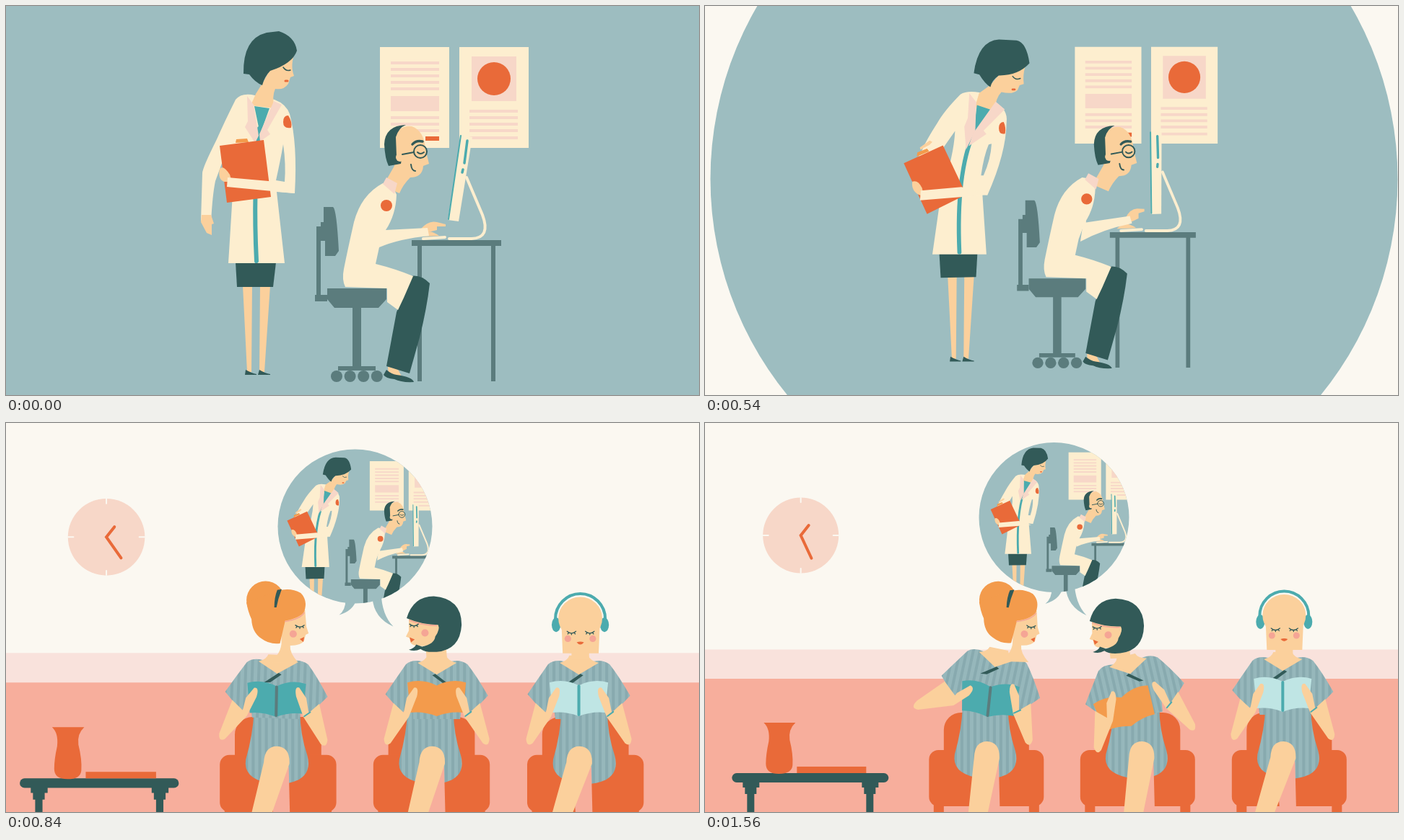
An HTML page with a canvas for the animation above (1.59 s loop, 960 by 540 pixels).

```html
<!DOCTYPE html>
<html lang="en">
<head>
<meta charset="utf-8">
<title>Waiting room</title>
<style>
html, body { margin: 0; overflow: hidden; background: #fbf8f1 }
canvas { display: block }
</style>
</head>
<body>
<canvas id="stage" width="960" height="540"></canvas>
<script>
const c = document.getElementById('stage').getContext('2d');
const LOOP = 1590, STEP = 30;
const AIR = '#9dbdc0', CREAM = '#fdeecf', DARK = '#325a58', SKIN = '#fbd09c', RED = '#e96a39',
  TEAL = '#4cabae', GREY = '#5b7c7d', PINK = '#f7d7c8', WALL = '#fbf8f1', BLUSH = '#f9e2dc',
  CORAL = '#f7ae9c', AMBER = '#f39b4c', ICE = '#bfe5e4', CHEEK = '#f5a595';

// Monotone curve through [time, value] pairs
function key(t, ...k) {
  const i = k.findIndex(p => p[0] > t);
  if (i < 0) return k[k.length - 1][1];
  if (!i) return k[0][1];
  const rate = j => (k[j][1] - k[j - 1][1]) / (k[j][0] - k[j - 1][0]);
  const slope = j => {
    if (!j || j === k.length - 1) return 0;
    const a = rate(j), b = rate(j + 1);
    return a * b <= 0 ? 0 : 2 * a * b / (a + b);
  };
  const [t0, v0] = k[i - 1], [t1, v1] = k[i], h = t1 - t0, u = (t - t0) / h, e = u * u * (3 - 2 * u);
  return v0 + (v1 - v0) * e + h * u * (1 - u) * (slope(i - 1) * (1 - u) - slope(i) * u);
}

// Blend two paths of the same structure
function mix(a, b, k) {
  const num = /-?[\d.]+/g, to = b.match(num);
  let i = 0;
  return a.replace(num, n => +n + (to[i++] - n) * k);
}

function fill(color, d) { c.fillStyle = color; c.fill(new Path2D(d)); }
function line(color, w, d) {
  c.strokeStyle = color; c.lineWidth = w; c.lineCap = 'round'; c.stroke(new Path2D(d));
}
function oval(color, x, y, rx, ry = rx) {
  c.fillStyle = color; c.beginPath(); c.ellipse(x, y, rx, ry, 0, 0, 7); c.fill();
}
function box(color, x, y, w, h, r = 0) {
  c.fillStyle = color; c.beginPath(); c.roundRect(x, y, w, h, r); c.fill();
}
function group(draw) { c.save(); draw(); c.restore(); }
function turn(deg, x, y) { c.translate(x, y); c.rotate(deg * Math.PI / 180); c.translate(-x, -y); }

const cloth = document.createElement('canvas');
cloth.width = 9; cloth.height = 4;
const cc = cloth.getContext('2d');
cc.fillStyle = '#96b7bb'; cc.fillRect(0, 0, 9, 4);
cc.fillStyle = '#88aaaf'; cc.fillRect(0, 0, 4, 4);
const GOWN = c.createPattern(cloth, 'repeat');

function posters() {
  for (const x of [518, 628]) box(CREAM, x, 57, 96, 140);
  for (const y of [77, 86, 95, 104, 113, 153, 162, 171]) box(PINK, 533, y, 67, 4);
  box(PINK, 533, 125, 67, 21);
  box(RED, 581, 181, 19, 6);
  box(PINK, 645, 70, 62, 62);
  oval(RED, 676, 101, 23);
  for (const y of [144, 153, 162, 171, 181]) box(PINK, 642, y, 67, 4);
}

function standingDoctor(lean, carry) {
  const part = (color, a, b, k = lean) => fill(color, mix(a, b, k));
  const stroke = (color, w, a, b) => line(color, w, mix(a, b, lean));
  fill(SKIN, 'M328 388H341L340 508H334ZM352 388H366L358 508H351Z');
  fill(DARK, 'M331 512L332 505Q341 510 347 511V512ZM349 512L351 505Q359 510 366 511V512Z');
  part(DARK, 'M318 356L374 356L370 390L320 390Z', 'M316 356L371 356L369 390L318 391Z');
  part(CREAM,
    'M340 123Q325 121 318 130Q303 160 292 185Q272 225 272 232L270 298L284 300Q286 262 290 243L304 205Q316 225 314 260L308 357L386 357L375 258L400 260Q404 190 393 150Q388 136 372 130Z',
    'M372 123Q354 120 345 126Q322 150 312 168Q295 195 290 208L284 222L300 228Q312 212 320 205L337 180Q336 215 318 270L306 357L384 357L378 270L386 271Q412 210 412 165Q414 148 396 137Z');
  part(AIR, 'M384 192Q380 215 374 242L386 244Q388 220 384 192Z', 'M387 198Q380 215 376 243L380 243Q390 220 391 197Z');
  part(SKIN, 'M271 290L284 290L288 302L285 303L285 318L278 315L270 300Z', 'M286 212L300 203L304 206L300 210L295 214L290 216L287 216Z', carry);
  part(SKIN,
    'M401 62Q393 82 399 97L394 99L391 108Q385 117 373 115Q368 125 372 142L339 138L346 122L356 106L366 88Z',
    'M438 84Q434 98 436 110L430 112L427 119Q420 126 404 122Q396 130 395 148L366 144L372 124L388 112L402 95Z');
  part(DARK,
    'M329 94Q328 45 361 37L378 35Q400 42 403 62Q397 80 366 90Q358 98 355 110Q345 106 337 95Z',
    'M364 95Q370 48 400 46L425 47Q440 50 444 80Q428 98 400 98Q390 105 388 115Q380 110 372 97Z');
  stroke(DARK, 1.5, 'M384 85Q388 91 394 89', 'M420 99Q424 105 431 102');
  stroke(RED, 3, 'M387 104L390 104', 'M420 118L423 118');
  part(TEAL, 'M344 139L365 142L352 178Z', 'M369 141L390 148L364 184Z');
  stroke(TEAL, 6, 'M351 170Q342 255 347 354', 'M365 180Q340 240 345 354');
  part(PINK, 'M334 125L343 137L350 180L345 190L331 168L335 160Z', 'M358 124L368 137L367 178L354 205L351 172L356 160Z');
  part(PINK, 'M371 132L382 137L362 172L366 178L352 188L351 178Z', 'M396 136L409 147L379 178L383 183L358 200L364 182Z');
  part(RED, 'M384 161Q384 152 391 152Q397 161 395 169Q384 171 384 161Z', 'M401 174Q401 165 408 165Q412 174 410 182Q401 184 401 174Z');
  part(AMBER, 'M318 190L319 185L334 184L336 189Z', 'M287 213L288 207L302 202L305 206Z', carry);
  part(RED, 'M296 194L357 186L367 265L306 273Z', 'M268 222L325 198L356 270L299 296Z', carry);
  part(SKIN, 'M296 226Q301 220 310 234L313 244L302 244Q293 240 296 226Z', 'M279 249Q287 246 293 258L296 270L288 268Q277 262 279 249Z', carry);
  part(CREAM, 'M307 238L386 245L400 260L306 251Z', 'M291 262L352 258L386 270L290 276Z', carry);
}

function deskAndChair(tilt) {
  box(GREY, 570, 330, 6, 191);
  box(GREY, 672, 330, 6, 191);
  box(GREY, 562, 325, 124, 8);
  line(CREAM, 4, 'M638 238L660 290Q672 322 645 323H614M578 323L608 321');
  group(() => {
    turn(tilt, 629, 240);
    fill(CREAM, 'M631 179L646 182L627 299L612 297Z');
    line(TEAL, 2, 'M630 180L613 296');
    line(TEAL, 3.5, 'M639 187L635 218M633 227L632 231');
  });
  fill(GREY, 'M440 279H453Q458 282 461 340L456 347H442V326H436V401H445V410H428V401H430V306H436V300H440Z');
  fill(GREY, 'M445 392H527V407L516 419H455L445 407ZM480 419H492V500H512V506H460V500H480Z');
  for (let i = 0; i < 4; i++) oval(GREY, 458 + i * 18.6, 514, 8);
}

function seatedDoctor(reach, nod) {
  fill(SKIN, 'M529 501H541L548 514H530Z');
  fill(DARK, 'M523 512L527 505Q534 511 541 512Q563 515 565 522Q548 523 538 518Q526 517 523 512Z');
  group(() => {
    c.translate(15 * nod, 6 * nod);
    fill(SKIN, 'M538 182Q545 165 562 167Q579 173 581 198L586 219L578 222Q577 238 560 238Q550 248 545 260L522 250L538 222Z');
    fill(DARK, 'M554 165Q525 166 524 192Q525 212 530 222L547 219Q550 211 541 208L540 182Q544 169 554 165Z');
    oval(SKIN, 546, 210, 6);
    line(DARK, 2, 'M565 203L549 206M565 202A9 9 0 1 0 583 202A9 9 0 1 0 565 202M570 203Q574 207 579 203M561 220Q562 229 567 229');
    line(DARK, 3.5, 'M563 192Q568 186 577 188');
  });
  fill(DARK, 'M560 375Q575 372 587 385Q583 420 573 460L559 510L527 500L541 425L550 400Z');
  fill(CREAM, 'M522 246Q492 262 482 300Q474 335 468 365Q465 380 470 390L528 392V411L543 422L551 405L564 375Q540 365 512 358L517 335L526 311Q540 290 541 262L535 248Z');
  group(() => {
    c.translate(4 * nod, 2 * nod);
    fill(PINK, 'M527 238L542 246L538 261L522 247Z');
  });
  fill(SKIN, 'M572 320Q584 307 600 319Z');
  fill(SKIN, mix('M574 310Q585 297 597 300L609 303L609 306L597 306L597 311L585 314Z',
    'M600 297Q600 282 608 277L616 274L616 279L613 285L613 296L606 304Z', reach));
  fill(CREAM, mix('M522 270L526 311L584 308L586 319Q545 323 517 335Z', 'M540 280L530 311L601 292L606 302Q560 318 523 344Z', reach));
  oval(RED, 527 + 4 * reach, 277, 8);
}

function office(t) {
  const s = key(t, [0, 1], [420, 1], [540, .96], [660, .736], [840, .49], [1290, .47]);
  const lift = key(t, [1290, 0], [1560, -12]);
  const nod = key(t, [200, 0], [500, 1]);
  box(AIR, 0, 0, 960, 540);
  const layer = (drift, draw) => group(() => {
    c.translate(506 * (1 - s) + drift, 49 * (1 - s) + lift);
    c.scale(s, s);
    draw();
  });
  layer(-8 * Math.min(1, t / 840), posters);
  layer(t * .002, () => {
    standingDoctor(key(t, [0, 0], [180, 1], [600, 1.05], [1290, 1], [1560, .75]),
      key(t, [0, 0], [180, 1], [540, 1.12]));
    deskAndChair(-9 * nod);
    seatedDoctor(key(t, [0, 0], [180, 1], [540, .4], [840, .35], [1290, .3], [1560, .1]), nod);
  });
}

function bubble(t) {
  const r = key(t, [450, 700], [540, 476], [660, 181], [840, 107], [1290, 104]);
  const y = key(t, [540, 240], [660, 163], [840, 143.5], [1290, 143], [1560, 131]);
  const left = key(t, [540, -110], [660, -41], [840, -22], [1290, -15], [1560, -12]);
  const right = key(t, [540, 160], [660, 68], [840, 53], [1290, 59], [1560, 45]);
  const tail = key(t, [540, 0], [660, .5], [840, 1]);
  const leftTip = r + 16 * tail, rightTip = r + 30 * tail + 2;
  group(() => {
    c.translate(483.5, y);
    fill(AIR, `M${left} ${leftTip}Q${left + 9} ${leftTip - 7} ${left + 9} ${r - 6}H${left + 24}Q${left + 20} ${leftTip - 6} ${left} ${leftTip}Z`);
    fill(AIR, `M${right} ${rightTip}Q${right - 27} ${rightTip - 12} ${right - 29} ${r - 8}L${right - 17} ${r - 16}Q${right - 16} ${rightTip - 16} ${right} ${rightTip}Z`);
  });
  group(() => {
    c.beginPath(); c.arc(483.5, y, r, 0, 7); c.clip();
    office(t);
  });
}

function clock(t) {
  const a = key(t, [660, 44], [840, 55], [1290, 57], [1560, 65]) * Math.PI / 180;
  oval(PINK, 137, 156, 52.5);
  line(WALL, 2, 'M137 104V110M137 202V208M85 156H92M182 156H189');
  line(RED, 4, `M148 142L137 156L${137 + 35 * Math.cos(a)} ${156 + 35 * Math.sin(a)}`);
}

function table() {
  box(DARK, 33, 486, 217, 13, 6.5);
  for (const x of [48, 213]) fill(DARK, `M${x} 498h23v8h-4v9h-3v40h-10v-40h-3v-9h-3z`);
  fill(RED, 'M77 416H121Q111 425 113 440Q118 460 117 475Q116 487 98 487Q80 487 80 473Q80 460 84 442Q86 424 77 416Z');
  box(RED, 123, 477, 96, 9);
}

const lash = (x, y) => line(DARK, 1.3, `M${x - 6} ${y - 1}Q${x} ${y + 4} ${x + 6} ${y - 1}M${x - 4} ${y + 1}l-1 1.5M${x} ${y + 2}v1.5M${x + 4} ${y + 1}l1 1.5`);

const heads = [
  () => {
    fill(SKIN, 'M2 268L34 255L36 278L39 287L35 289L33 297Q29 304 14 304Q13 314 25 327L-15 327Q0 318 2 302Z');
    oval(AMBER, -20, 242, 26);
    fill(AMBER, 'M-46 245Q-44 258 -39 268Q-38 286 -26 294Q-14 303 0 301L7 270Q28 266 33 257Q38 242 28 232Q14 224 -3 229Z');
    line(CHEEK, 1.5, 'M7 271Q27 268 33 259');
    fill(DARK, 'M-4 228L2 227Q-3 240 -5 252L-8 252Q-8 238 -4 228Z');
    lash(27, 277);
    oval(CHEEK, 18, 288, 5);
    fill(RED, 'M27 295L33 292L32 299Z');
  },
  () => {
    fill(SKIN, 'M-38 264L-38 284L-42 292L-37 294L-36 300Q-33 306 -15 305L-14 320L14 320L10 275Z');
    fill(DARK, 'M-41 267Q-32 237 -4 237Q34 240 34 276Q32 310 0 313Q-16 314 -22 309Q-30 313 -38 310Q-30 308 -28 303L-20 306Q-3 302 -2 292Q5 282 2 276Q-20 276 -41 267Z');
    line(CHEEK, 1.5, 'M-37 270Q-20 277 0 277');
    lash(-31, 276);
    oval(CHEEK, -16, 287, 5);
    fill(RED, 'M-37 293L-30 296L-35 300Z');
  },
  () => {
    for (const x of [-31, 35]) oval(TEAL, x, 276, 6, 10);
    oval(SKIN, 2, 267, 30, 29);
    fill(SKIN, 'M-24 268H29L27 315H14V324H-10V315H-22Z');
    line(TEAL, 4, 'M-32 271V268A33.5 34 0 0 1 36 268V271');
    lash(-10, 286);
    lash(15, 286);
    oval(CHEEK, -15, 295, 4.5);
    oval(CHEEK, 19, 295, 4.5);
    fill(RED, 'M-3 300Q2 298 7 300Q2 306 -3 300Z');
  }
];

const ARM = 'M-59 383L-72 432Q-71 444 -63 438L-38 402L-27 374Q-24 360 -31 362L-41 376L-45 396Z';
const ARM_OUT = 'M-64 378L-96 412Q-104 424 -92 424L-45 408L-27 390Q-20 378 -28 376L-44 390L-46 394Z';

// bend runs from 0, upright, to 1, turned by the angles and shifts given
function reader(i, seat, x, o) {
  const k = o.bend || 0, shift = ([dx, dy] = [0, 0]) => c.translate(dx * k, dy * k);
  const lean = (o.lean || 0) * k;
  group(() => {
    c.translate(seat, 0);
    box(RED, -59, 402, 118, 100, 24);
    box(RED, -79.5, 454, 159, 78, 13);
    for (const foot of [-73, 59]) box(RED, foot, 530, 14, 20);
    fill(GOWN, 'M-33 395H30Q30 425 40 455Q46 478 28 488Q8 497 -15 492Q-48 485 -44 460Q-34 425 -33 395Z');
    fill(CORAL, `M${o.knee - 10} 480L${o.knee + 16} 470L${o.knee + 18} 550H${o.knee - 4}Z`);
    c.translate(o.knee, 0);
    const f = o.foot - o.knee;
    fill(SKIN, `M-18 464Q-17 442 0 442Q18 443 17 466L${f + 12} 550H${f - 14}Z`);
  });
  group(() => {
    shift([0, o.drop]);
    turn(lean, seat, 420);
    c.translate(x, 0);
    fill(GOWN, 'M-20 326Q-34 323 -42 330Q-56 350 -70 371L-47 397L-35 382L-32 405H32L35 382L47 397L70 373Q54 345 42 330Q32 323 20 326L0 342Z');
    fill(SKIN, 'M-13 318H13Q15 325 27 328L0 344L-26 328Q-15 325 -13 318Z');
    fill(DARK, i === 1 ? 'M-2 343L16 357L10 357L-6 345Z' : 'M2 343L-18 357L-9 356L6 345Z');
    group(() => { turn(-lean * .85, 3, 325); shift(o.head); heads[i](); });
    group(() => {
      shift(o.read);
      turn((o.tip || 0) * k, 0, 380);
      fill(o.cover, 'M0 359Q-20 349 -40 355L-36 396Q-18 394 0 401Q18 394 36 396L40 355Q20 349 0 359Z');
      if (o.spine) line(o.spine, 4, 'M0 360V399');
    });
    fill(SKIN, mix(ARM, ARM_OUT, o.elbow || 0));
    c.scale(-1, 1);
    fill(SKIN, ARM);
    line(TEAL, 2, 'M-39 401L-47 395');
  });
}

function room(t) {
  const s = key(t, [480, 4], [540, 2.6], [660, 1.343], [840, 1.015], [1290, 1]);
  const drift = (t - 1290) * .016;
  const layer = (dx, draw) => group(() => {
    c.translate(480 * (1 - s) + dx, 0);
    c.scale(s, s);
    draw();
  });
  box(WALL, 0, 0, 960, 540);
  box(BLUSH, 0, 314.5 * s, 960, 41 * s);
  box(CORAL, 0, 355 * s, 960, 540);
  layer(-drift, () => clock(t));
  bubble(t);
  const out = key(t, [640, 0], [840, .17], [1220, 1]), back = key(t, [1300, 0], [1560, 1]);
  layer(drift, () => {
    table();
    reader(0, 385.5, 381.5, {
      bend: out, lean: 12, drop: -6, head: [18, 8], read: [2, 13], tip: -6, elbow: out,
      knee: -2 + 3 * out, foot: -29 + 17 * out, cover: TEAL, spine: GREY
    });
    reader(1, 595, 602, {
      bend: back, lean: -13, drop: 4, head: [-9, 2], read: [-17, 14], tip: -6,
      knee: 2 - 5 * out + 9 * back, foot: -27 + 28 * out - 7 * back, cover: AMBER
    });
    reader(2, 805, 796, { knee: -8, foot: -36, cover: ICE, spine: TEAL });
  });
}

function frame() {
  const t = Math.floor(performance.now() % LOOP / STEP) * STEP;
  if (t < 500) office(t); else room(t);
  requestAnimationFrame(frame);
}
frame();
</script>
</body>
</html>
```
